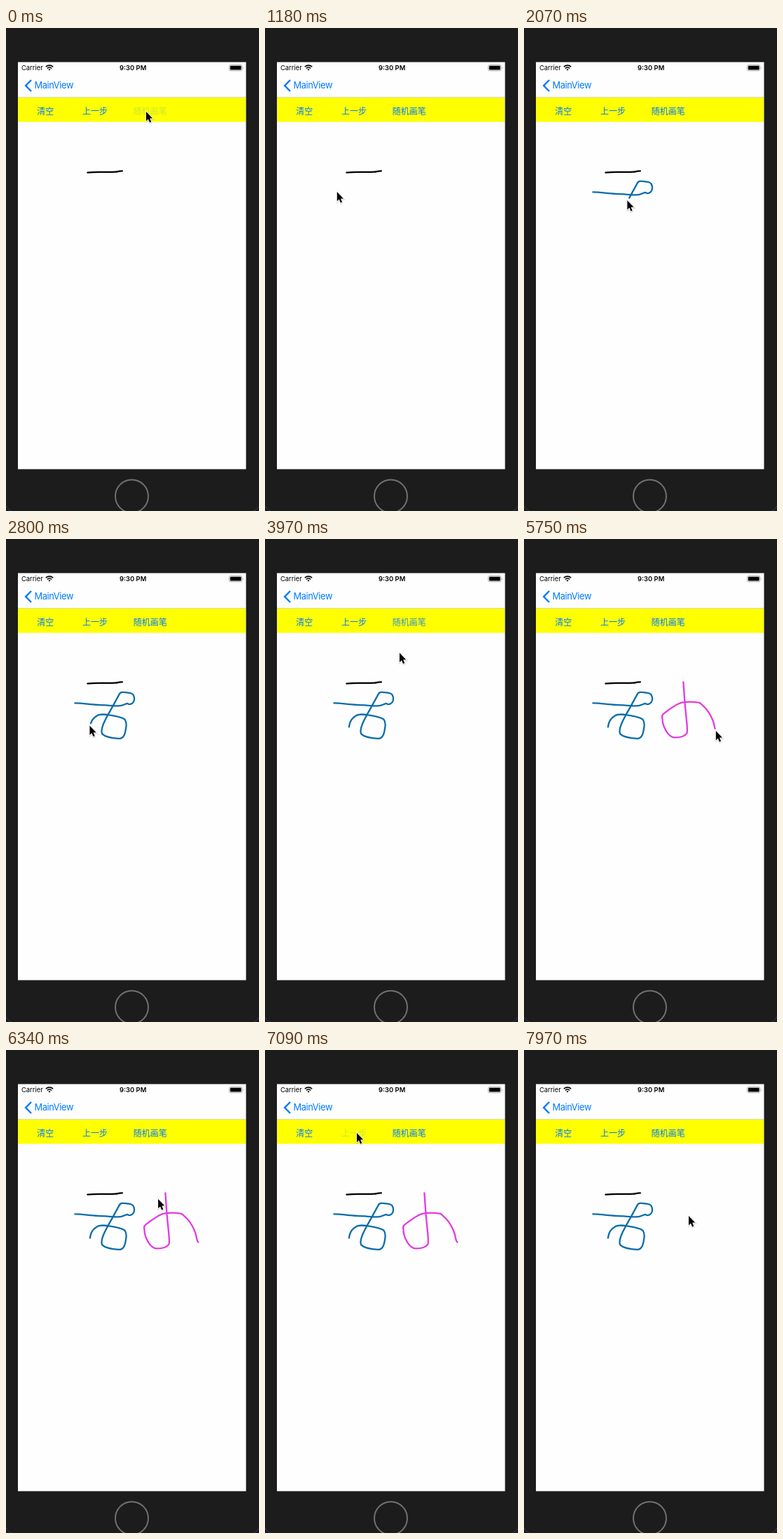
Write an HTML page that moves like this. It is 361 by 687 pixels and loops after 8000 ms.

```html
<!DOCTYPE html>
<html lang="zh-CN">
<head>
<meta charset="utf-8">
<style>
  html, body { margin: 0; width: 100%; height: 100%; overflow: hidden; background: #1c1c1c; }
  svg { display: block; width: 100vw; height: 100vh; }
  text { font-family: Inter, sans-serif; font-size: 9.4px; }
  .title { font-size: 12.9px; letter-spacing: -.4px; fill: #007aff; }
  .button { font: 12px "Noto Sans CJK SC", "Noto Sans CJK", sans-serif; fill: #007aff; }
  .line { fill: none; stroke-width: 2.3; stroke-linecap: round; stroke-linejoin: round; }
</style>
</head>
<body>
<svg viewBox="0 0 361 687">
  <rect width="361" height="687" fill="#1c1c1c"/>
  <path d="M-1 679Q3 685 9 688M362 679Q358 685 352 688" fill="#141418" stroke="#3a3868"/>
  <circle cx="179.5" cy="666" r="23.5" fill="none" stroke="#707070" stroke-width="2"/>
  <rect x="17" y="48.5" width="325.5" height="579" fill="#fefefe"/>

  <text x="22" y="60">Carrier</text>
  <g fill="none" stroke="#000" stroke-width="1.6">
    <path d="M56.8 55.3A7.3 7.3 0 0 1 67.2 55.3M58.9 57.4A4.4 4.4 0 0 1 65.1 57.4"/>
    <path d="M60.4 59A2.2 2.2 0 0 1 63.6 59L62 60.6Z" fill="#000" stroke="none"/>
  </g>
  <text x="181.2" y="60" text-anchor="middle" font-weight="600">9:30 PM</text>
  <rect x="318.5" y="52.6" width="18.4" height="8.2" rx="2" fill="none" stroke="#999" stroke-width=".8"/>
  <rect x="319.8" y="53.8" width="15.8" height="5.8" rx="1"/>
  <path d="M338 55.2Q339.4 56.7 338 58.2Z" fill="#999"/>

  <path d="M36 74L28.2 82L36 90" fill="none" stroke="#007aff" stroke-width="2.5"/>
  <text class="title" x="40.5" y="86.2">MainView</text>
  <rect x="17" y="98" width="325" height="1" fill="#d8d8c0"/>
  <rect x="17" y="99" width="325" height="34.5" fill="#ff0"/>
  <text class="button" x="44.2" y="122.7">清空</text>
  <text class="button" id="undo" x="109" y="122.7">上一步</text>
  <text class="button" id="brush" x="181.8" y="122.7">随机画笔</text>

  <g class="line" transform="translate(.4 .4)">
    <path stroke="#000" d="M116 205.2C124 204.5 130 204.4 138 204.5S152 204.5 156 204.2S159 203 165.5 203"/>
    <path id="blue" stroke="#0c6da8" d="M98 233C110 233 118 235 131 235.5S153 237 160 237S169 234 173 233.5Q174 235 177 234.5C183 233 184 226 181 221C179 218 172 218 167 217.5Q163 217 161.5 220L150 241C142 255 133 270 137 277C141 281 152 283 161 283.5C169 283 170 274 171 267Q172 260 169 256C164 253 154 251 147 250C141 249 133 249 130 250.5C122 255 120 262 119.5 267"/>
    <path id="pink" stroke="#e23be0" d="M227 203L229 232L232 262Q233 274 232 276C229 280 222 282 215 282C206 282 197 267 197 254Q196 250 199 248C208 241 219 233 226 232C233 231 241 231 247 232Q251 232 254 236C262 242 269 255 271 264Q272 271 274 273"/>
  </g>

  <g id="cursor">
    <path d="M1 1V14.2L4 11.4L6 16.4L8.2 15.5L6.2 10.6H10.2Z" fill="none" stroke="#000" stroke-opacity=".15" stroke-width="2.4" transform="translate(.3 .9)"/>
    <path d="M1 1V14.2L4 11.4L6 16.4L8.2 15.5L6.2 10.6H10.2Z" stroke="#fff" stroke-width="1.6" paint-order="stroke"/>
  </g>
</svg>
<script>
  const LOOP = 8000, STEP = 147.2;
  const [undo, brush, blue, pink, cursor] = ['undo', 'brush', 'blue', 'pink', 'cursor']
    .map(id => document.getElementById(id));

  const strokes = [
    { path: blue, start: 8, duration: 11.2, gone: Infinity },
    { path: pink, start: 33, duration: 6.1, gone: 49 }
  ];
  const moves = [
    { start: 1, end: 6, from: [199, 118], to: [97, 233] },
    { start: 20, end: 24, from: [118, 266], to: [196, 118] },
    { start: 25, end: 27, from: [196, 118], to: [191, 161] },
    { start: 27, end: 31, from: [191, 161], to: [226, 203] },
    { start: 40, end: 47, from: [272, 272], to: [130, 117] },
    { start: 52, end: 54, from: [130, 117], to: [234, 235] }
  ];

  const clamp = u => Math.min(1, Math.max(0, u));
  const smooth = u => u * u * (3 - 2 * u);

  // A button dims when pressed, then fades back.
  function buttonOpacity(step, ...presses) {
    const last = presses.filter(press => press <= step).pop() ?? -Infinity;
    return .2 + .8 * clamp((step - last - 1) * .375);
  }

  // Draws the ink and returns the cursor, which runs slightly ahead of it.
  function drawStroke({ path, start, duration, gone }, step) {
    const total = path.getTotalLength();
    const ink = total * clamp((step - start) / duration) ** 1.2;
    path.style.strokeDasharray = `${ink} ${total + 9}`;
    path.style.visibility = ink && step < gone ? 'visible' : 'hidden';
    const tip = path.getPointAtLength(ink + 5);
    return [tip.x - 1.2, tip.y - 1];
  }

  function moveCursor(step) {
    const { start, end, from, to } = moves.findLast(move => move.start <= step) ?? moves[0];
    const u = smooth(clamp((step - start) / (end - start)));
    return from.map((v, i) => v + (to[i] - v) * u);
  }

  function render(time) {
    const step = Math.floor((time % LOOP + 4) / STEP);
    let position = moveCursor(step);
    for (const stroke of strokes) {
      const tip = drawStroke(stroke, step);
      if (step >= stroke.start && step < stroke.start + stroke.duration) position = tip;
    }
    brush.style.opacity = buttonOpacity(step, -1, 24);
    undo.style.opacity = buttonOpacity(step, 48);
    cursor.setAttribute('transform', `translate(${position})`);
  }

  const origin = performance.now();
  function tick() {
    render(performance.now() - origin);
    requestAnimationFrame(tick);
  }
  tick();
</script>
</body>
</html>
```
